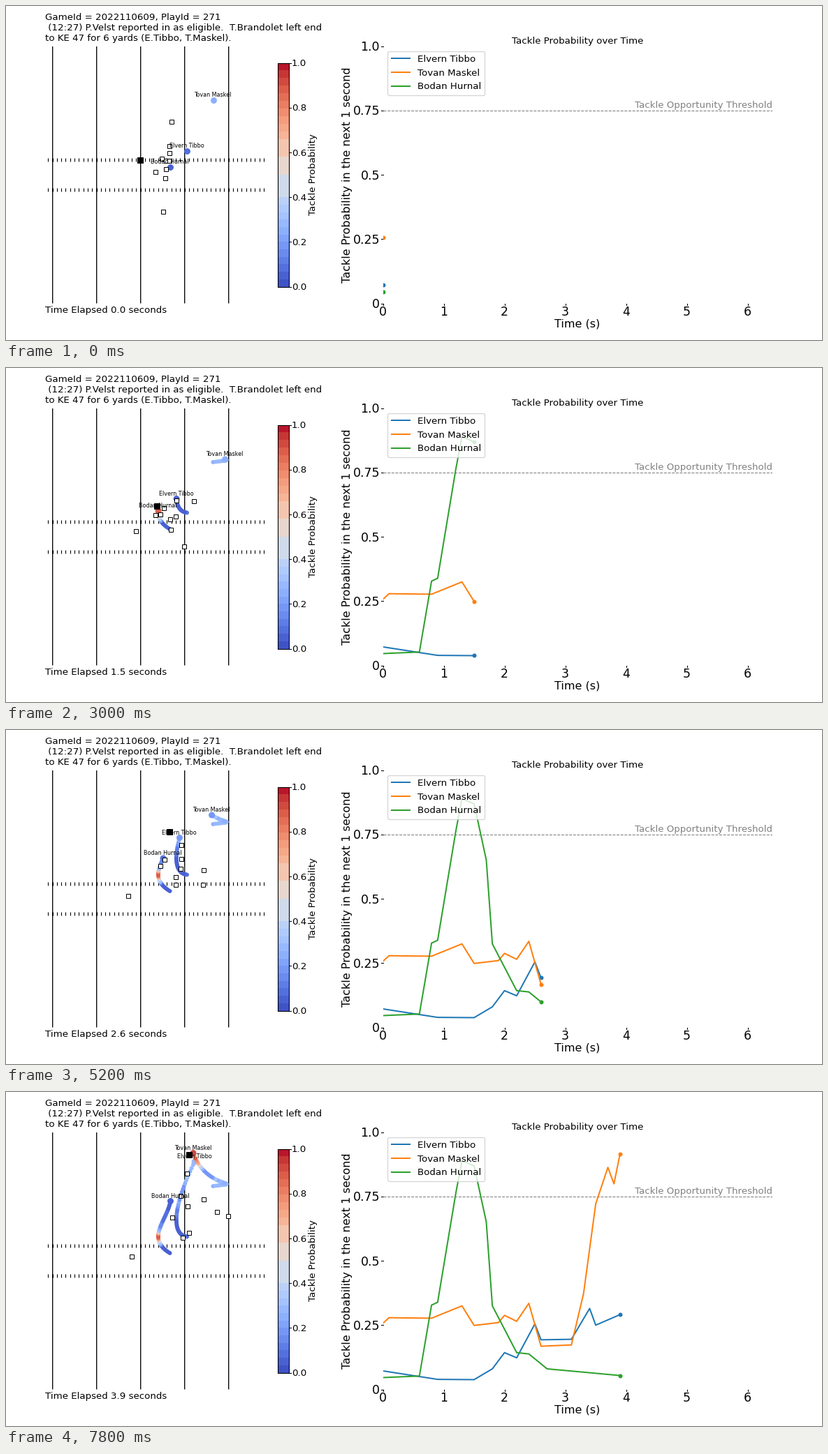
Animation, 1168 px wide and 479 px high, one loop 8 s. Source, as a matplotlib script:

```python
import numpy as np
import matplotlib.pyplot as plt
from matplotlib.animation import FuncAnimation

W, H, DPI = 1168, 479, 96
STEPS, STEP_MS = 40, 200
TIME = np.arange(STEPS) / 10

LEFT, RIGHT, TOP, BOTTOM = 539.5, 1096.5, 58, 426.5  # chart box in pixels
T_MAX = 6.4
YARD = 6.3

plt.rcParams.update({"font.family": "DejaVu Sans", "font.size": 10})


def track(*points):
    """Polynomial path through a few evenly timed points, one row per step."""
    keys = np.linspace(0, TIME[-1], len(points))
    coefs = np.polyfit(keys, np.array(points, float), len(points) - 1)
    return np.vander(TIME, len(points)) @ coefs


def curve(*knots):
    """Straight segments between (time, probability) knots."""
    return np.interp(TIME, *zip(*knots))


RUNNER = track((191.8, 220.5), (212.5, 205), (233.5, 146), (262, 90))

BLOCKERS = np.array([
    track((237, 165.5), (266.5, 187.5), (283, 200.5), (302, 172)),
    track((229, 221.5), (223.5, 204), (251, 184.5), (282.5, 154)),
    track((234, 201), (247, 181), (259, 117)),
    track((234, 211), (245.5, 209), (260, 164)),
    track((229, 234), (222, 201), (250, 149)),
    track((214.5, 238), (216.5, 204.5), (238, 180)),
    track((234, 222), (237.5, 214.5), (262, 202)),
    track((228.5, 247), (238.5, 228), (253, 209)),
    track((225.5, 295.5), (265.5, 242.5), (318, 178.5)),
    track((223, 219), (179.5, 236), (180.5, 236)),
])

DEFENDERS = [
    ("Elvern Tibbo", "tab:blue",
     track((259, 207.5), (244.6, 192), (248.5, 154.5), (270, 100)),
     curve((0, .072), (.9, .039), (1.5, .038), (1.8, .08), (2, .143),
           (2.2, .123), (2.5, .255), (2.6, .193), (3.1, .195),
           (3.4, .315), (3.5, .25), (3.9, .291))),
    ("Tovan Maskel", "tab:orange",
     track((296.5, 135), (315, 131.5), (294.5, 122), (268, 87.5)),
     curve((0, .257), (.1, .279), (.8, .277), (1.3, .325), (1.5, .249),
           (1.9, .26), (2, .288), (2.2, .265), (2.4, .335), (2.6, .168),
           (3.1, .173), (3.3, .373), (3.5, .722), (3.7, .864),
           (3.8, .8), (3.9, .917))),
    ("Bodan Hurnal", "tab:green",
     track((234.5, 231), (218, 208.7), (225, 184), (235.5, 156.5)),
     curve((0, .046), (.6, .052), (.8, .328), (.9, .339), (1.2, .765),
           (1.3, .89), (1.5, .87), (1.7, .652), (1.8, .325), (2.2, .143),
           (2.4, .138), (2.7, .08), (3.9, .054))),
]

# Stepped colour scale, with wider bands around the middle
EDGES = np.r_[np.linspace(0, .4, 13), .5, .58, np.linspace(.66, 1, 11)]
BANDS = plt.get_cmap("coolwarm")((EDGES[:-1] + EDGES[1:]) / 2)


def band_colors(values):
    return BANDS[np.clip(np.digitize(values, EDGES) - 1, 0, len(BANDS) - 1)]


fig = plt.figure(figsize=(W / DPI, H / DPI), dpi=DPI, facecolor="white")
stage = fig.add_axes([0, 0, 1, 1])
stage.axis("off")
chart = fig.add_axes([LEFT / W, 1 - BOTTOM / H,
                      (RIGHT - LEFT) / W, (BOTTOM - TOP) / H])
chart.axis("off")


def label(x, y, text, size=10, **kw):
    return stage.text(x, y, text, fontsize=size, **kw)


def draw_field():
    label(56, 20, "GameId = 2022110609, PlayId = 271")
    label(56, 35, " (12:27) P.Velst reported in as eligible.  "
                  "T.Brandolet left end")
    label(56, 50, "to KE 47 for 6 yards (E.Tibbo, T.Maskel).")
    lines = 66.7 + 10 * YARD * np.arange(5)
    stage.vlines(lines, TOP, BOTTOM, color="black", lw=1, zorder=1,
                 snap=False)
    hashes = 66.5 + YARD * np.arange(-1, 49)
    for y in (220.5, 263):
        stage.vlines(hashes, y - 2.5, y + 2.5, color="black", lw=.8, zorder=1)


def draw_scale():
    left, right, low, size = 388.5, 405, 402.5, 321
    stage.bar((left + right) / 2, -size * np.diff(EDGES), right - left,
              low - size * EDGES[:-1], color=BANDS, lw=0)
    stage.plot([left, right, right, left, left],
               [low, low, low - size, low - size, low], "k", lw=.8)
    for v in np.arange(6) / 5:
        y = low - size * v
        stage.plot([right, right + 3], [y, y], "k", lw=.8)
        label(409, y + 4.8, f"{v:.1f}")
    label(439.5, 241.5, "Tackle Probability", rotation=90,
          ha="center", va="center")


def draw_chart_frame():
    mid = (LEFT + RIGHT) / 2
    label(mid, 53.5, "Tackle Probability over Time", ha="center")
    label(mid, 460.5, "Time (s)", 12, ha="center")
    label(488.5, 242.5, "Tackle Probability in the next 1 second", 12,
          rotation=90, ha="center", va="center")
    for v in np.arange(5) / 4:
        y = BOTTOM - v * (BOTTOM - TOP)
        text = "1.0" if v == 1 else f"{v:g}"
        stage.plot([LEFT - 2.5, LEFT], [y, y], "k", lw=.8)
        label(535, y + 6.3, text, 13, ha="right")
    for s in range(7):
        x = LEFT + s * (RIGHT - LEFT) / T_MAX
        stage.plot([x, x], [BOTTOM, BOTTOM + 2.5], "k", lw=.8)
        label(x, 444, str(s), 13, ha="center")
    chart.axhline(.75, color="gray", ls="--", lw=.8)
    label(RIGHT, 146, "Tackle Opportunity Threshold",
          ha="right", color="gray")


draw_field()
draw_scale()
draw_chart_frame()

clock = label(56, 440, "")
blockers, = stage.plot([], [], "s", ms=4.8, mfc="white", mec="black",
                       mew=.75, zorder=4)
runner, = stage.plot([], [], "s", ms=5.5, color="black", mew=.75, zorder=5)
trails, tags, curves, dots = [], [], [], []
for name, color, _, _ in DEFENDERS:
    trails.append(stage.scatter([], [], lw=0, zorder=3))
    tags.append(label(0, 0, name, 6, ha="center", zorder=6))
    curves += chart.plot([], [], color=color, lw=1.5, label=name)
    dots += chart.plot([], [], "o", color=color, ms=4.5, mew=0)

stage.set(xlim=(0, W), ylim=(H, 0))
chart.set(xlim=(0, T_MAX), ylim=(0, 1))
chart.legend(loc="upper left", fontsize=10)


def update(k):
    clock.set_text(f"Time Elapsed {TIME[k]:.1f} seconds")
    blockers.set_data(*BLOCKERS[:, k].T)
    runner.set_data(*RUNNER[k:k + 1].T)
    past = slice(k + 1)
    for i, (_, _, path, probs) in enumerate(DEFENDERS):
        x, y = path[k]
        trails[i].set_offsets(path[past])
        trails[i].set_sizes([20] * k + [45])
        trails[i].set_facecolor(band_colors(probs[past]))
        tags[i].set_position((x - .3, y - 5))
        curves[i].set_data(TIME[past], probs[past])
        dots[i].set_data([TIME[k]], [probs[k]])


anim = FuncAnimation(fig, update, frames=STEPS, interval=STEP_MS,
                     init_func=lambda: update(0), repeat=True, repeat_delay=0)
plt.show()
```
